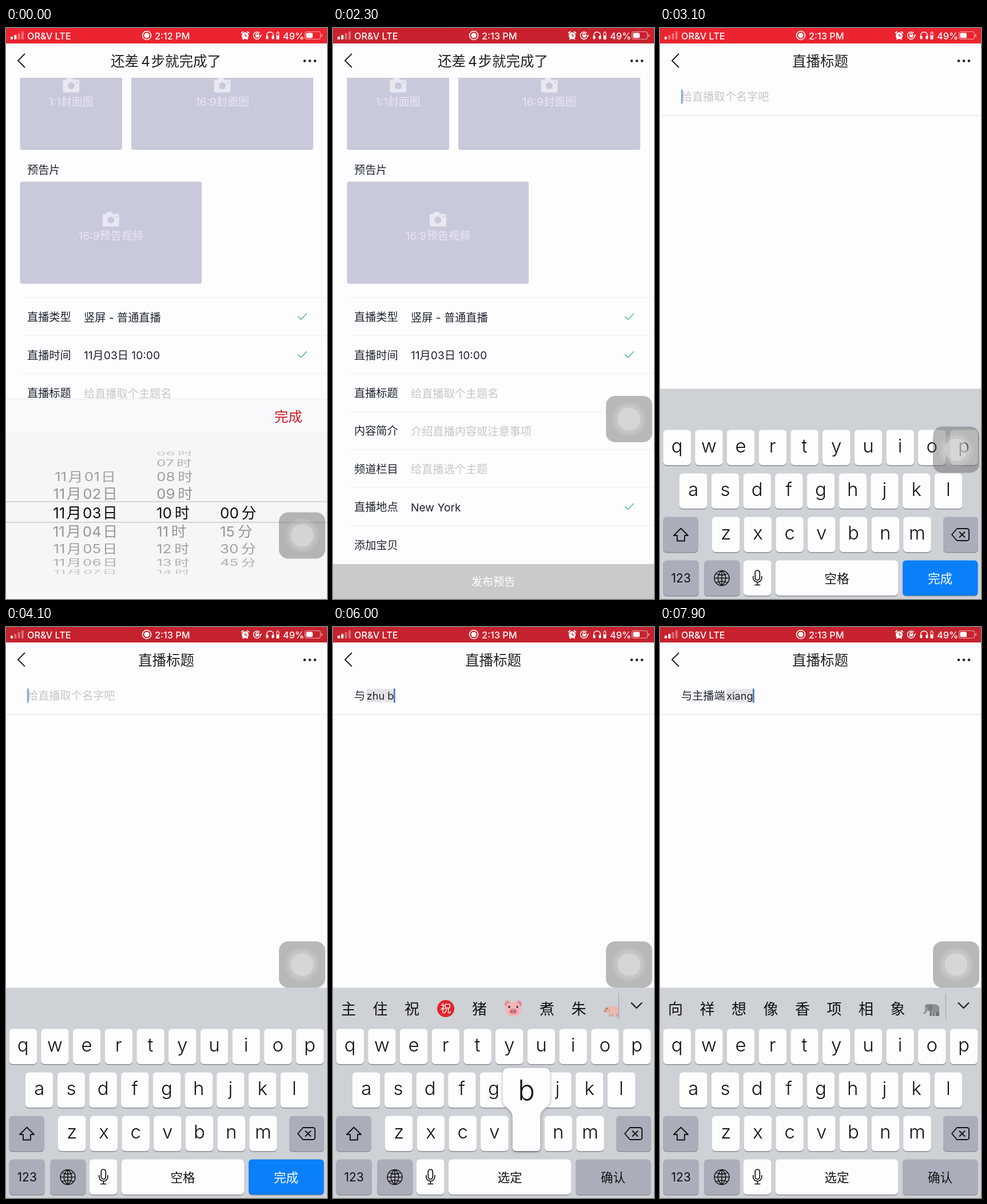
An HTML page with a canvas for the animation above (8000 ms loop, 561 by 998 pixels).

```html
<!DOCTYPE html>
<html lang="zh-CN">
<head>
<meta charset="utf-8">
<style>
html, body { margin: 0; width: 100%; height: 100%; overflow: hidden; background: #fdfcfe }
canvas { display: block }
</style>
</head>
<body>
<canvas id="stage" width="561" height="998"></canvas>
<script>
const W = 561, H = 998, LOOP = 8000;
const g = document.getElementById('stage').getContext('2d');
const FONT = 'Inter, "Noto Sans CJK SC", "Noto Sans CJK", sans-serif';
const PAGE = '#fdfcfe', INK = '#1d2430', HINT = '#c6c6ca', TILE = '#c9c9dc', ON_TILE = '#e8e8f1';

// Drawing helpers
function text(s, x, cy, size = 19.2, color = INK, align = 'left', weight = 400) {
  g.font = `${weight} ${size}px ${FONT}`;
  g.textAlign = align;
  g.fillStyle = color;
  g.fillText(s, x, cy + size * .37);
}
function box(x, y, w, h, color, r = 0) {
  g.fillStyle = color;
  g.beginPath();
  g.roundRect(x, y, w, h, r);
  g.fill();
}
function oval(x, y, rx, ry, color) {
  g.fillStyle = color;
  g.beginPath();
  g.ellipse(x, y, rx, ry, 0, 0, 7);
  g.fill();
}
function stroke(d, color, width, x = 0, y = 0) {
  g.save();
  g.translate(x, y);
  g.strokeStyle = color;
  g.lineWidth = width;
  g.lineJoin = 'round';
  g.stroke(new Path2D(d));
  g.restore();
}
function shifted(x, y, draw) {
  g.save();
  g.translate(x, y);
  draw();
  g.restore();
}

// Timing helpers
const clamp = v => Math.max(0, Math.min(1, v));
const span = (t, start, length) => clamp((t - start) / length);
const smooth = v => v * v * (3 - 2 * v);
const move = (t, start, length) => smooth(span(t, start, length));

function statusBar(t) {
  const cycle = 1870, k = ((t - 2210) % cycle + cycle) % cycle;
  const glow = smooth(clamp((Math.min(k, cycle - k) - 40) / 300));
  const mix = (a, b) => Math.round(a + (b - a) * glow);
  box(0, 0, W, 27, `rgb(${mix(198, 235)},${mix(34, 36)},${mix(46, 48)})`);
  const full = t > 2850 && t < 4600 ? 1 : 2;
  for (let i = 0; i < 4; i++)
    box(8 + i * 6.3, 15 - i * 3, 4, 5 + i * 3, i < full ? '#fff' : 'rgba(255,255,255,.35)', 1);
  text('OR&V LTE', 37, 13.5, 16.3, '#fff', 'left', 500);
  stroke('M253.5 13a7.5 7.5 0 1 1-15 0a7.5 7.5 0 1 1 15 0', '#fff', 1.6);
  oval(246, 13, 4.5, 4.5, '#fff');
  text(t < 1200 ? '2:12 PM' : '2:13 PM', 260, 13.5, 16.3, '#fff', 'left', 500);
  // alarm, rotation lock, headphones with their battery
  oval(418, 13.5, 6, 6, '#fff');
  stroke('M411 9l4-3M425 9l-4-3M413.5 20l2-2M422.5 20l-2-2', '#fff', 2);
  stroke('M418 10v4h3', '#d4232f', 1.3);
  stroke('M443.5 9a6.3 6.3 0 1 0 1.5 5M437 12.5v-1.5a2 2 0 0 1 4 0v1.5', '#fff', 1.4);
  box(436, 12, 6, 4.5, '#fff', 1);
  stroke('M442.5 12l2.5 2.5l2-3', '#fff', 1.2);
  stroke('M455.5 15v-2a6 6 0 0 1 12 0v2', '#fff', 1.4);
  box(454.5, 13.5, 4, 6, '#fff', 1.5);
  box(464.5, 13.5, 4, 6, '#fff', 1.5);
  stroke('M473 8h4v11.5h-4zM474 6.5h2', '#fff', 1);
  box(473, 13, 4, 6.5, '#fff');
  text('49%', 484, 13.5, 16.3, '#fff', 'left', 500);
  stroke('M526 6.5h20a3.5 3.5 0 0 1 3.5 3.5v6a3.5 3.5 0 0 1-3.5 3.5h-20a3.5 3.5 0 0 1-3.5-3.5v-6a3.5 3.5 0 0 1 3.5-3.5z',
    'rgba(255,255,255,.6)', 1.1);
  box(524.5, 8.5, 11.5, 9, '#fff', 2);
  box(551, 11, 1.8, 4.5, 'rgba(255,255,255,.6)', 1);
}

function header() {
  box(0, 27, W, 60, PAGE);
  stroke('M33 45L21 57L33 69', '#222', 2);
  for (const x of [522, 531, 540]) oval(x, 57.5, 2.3, 2.3, '#222');
}

function camera(x, y) {
  box(x - 14.5, y - 9.5, 29, 22, ON_TILE, 3);
  box(x - 8, y - 13, 11, 6, ON_TILE, 2);
  oval(x, y + 1, 6, 6, TILE);
  oval(x + 10, y - 5, 1.6, 1.6, TILE);
}

const FORM = [
  ['直播类型', '竖屏 - 普通直播', true],
  ['直播时间', '11月03日 10:00', true],
  ['直播标题', '给直播取个主题名'],
  ['内容简介', '介绍直播内容或注意事项'],
  ['频道栏目', '给直播选个主题'],
  ['直播地点', 'New York', true],
  ['添加宝贝', '']
];

function formPage() {
  box(0, 27, W, H, PAGE);
  const tile = (x, y, w, h, label, cy) => {
    box(x, y, w, h, TILE, 4);
    camera(x + w / 2, cy);
    text(label, x + w / 2, cy + 28.5, 19, ON_TILE, 'center');
  };
  tile(24.5, 60, 178.5, 153, '1:1封面图', 100);
  tile(219, 60, 318, 153, '16:9封面图', 100);
  text('预告片', 37, 248);
  tile(24.5, 268.5, 317.5, 178.5, '16:9预告视频', 334.5);
  FORM.forEach(([label, value, done], i) => {
    const y = 505 + i * 66.4;
    box(27, y - 34, W, 1, '#f0eff2');
    text(label, 37, y);
    text(value, 136, y + .7, 19.2, done ? INK : HINT);
    if (done) stroke('M510 504L515.5 509.5L525.5 499', '#62bd8f', 1.7, 0, y - 505);
  });
  box(0, 937, W, 61, '#cacaca');
  text('发布预告', 280, 968, 19.2, '#fff', 'center');
  header();
  text('还差', 183, 57.5, 24.5, '#222');
  text('4', 236, 57.5, 24.5, '#222');
  text('步就完成了', 253.5, 57.5, 24.5, '#222');
}

function picker() {
  box(0, 649, W, 349, '#f6f6f8');
  box(0, 649, W, 60, '#f9f9fb');
  box(0, 648, W, 1, '#e9e9eb');
  box(0, 708, W, 1, '#ededef');
  text('完成', 469, 679, 24.4, '#d01c28');
  const two = n => String(n).padStart(2, '0');
  const wheel = (x, align, from, to, label) => {
    for (let k = from; k <= to; k++) {
      const a = k * .305;
      g.save();
      g.translate(x, 847 + 110 * Math.sin(a));
      g.scale(1, Math.cos(a));
      g.globalAlpha = k ? Math.cos(a) ** .7 * .43 : 1;
      text(label(k), 0, 0, 26, '#111', align);
      g.restore();
    }
  };
  wheel(138.5, 'center', -2, 4, k => `11\u200a月\u200a${two(3 + k)}\u200a日`);
  wheel(263, 'left', -4, 4, k => `${two(10 + k)}\u2009时`);
  wheel(374, 'left', 0, 3, k => `${two(15 * k)}\u2009分`);
  box(0, 827.5, W, 1, '#b5b5b9');
  box(0, 863.5, W, 1, '#b5b5b9');
}

// Typing: time, committed text, letters being composed, suggestions (@ marks a pictogram)
const EVENTS = [
  [0, '', '', ''],
  [4450, '', 'y', '有 一 要 也 与 用 又 以 于'],
  [4650, '', 'yu', '与 于 鱼 雨 语 玉 遇 余 育'],
  [4950, '与', '', '其 你 我 他 她 人 此 会 时'],
  [5300, '与', 'z', '在 这 再 着 中 做 最 自 走'],
  [5480, '与', 'zh', '这 着 中 只 找 真 之 张 祝'],
  [5680, '与', 'zhu', '主 住 祝 @z 猪 @p 煮 朱 @g'],
  [5940, '与', 'zhu b', '主播 主板 猪八 主 住 祝 猪'],
  [6110, '与', 'zhu bo', '主播 煮 主 住 祝 猪 朱 助'],
  [6330, '与', 'zhu bo d', '主播的 主播 主 住 祝 猪'],
  [6450, '与', 'zhu bo du', '主播都 主播 主 住 祝 猪'],
  [6570, '与', 'zhu bo dua', '主播端 主播 主 住 祝 猪'],
  [6700, '与', 'zhu bo duan', '主播端 主播 主 住 祝 猪'],
  [6950, '与主播端', '', '着 的 起 在 上来 上 游 了 一'],
  [7260, '与主播端', 'x', '小 想 下 先 行 需 像 写 新'],
  [7390, '与主播端', 'xi', '系 西 洗 细 喜 希 吸 息 习'],
  [7510, '与主播端', 'xia', '下 夏 吓 虾 瞎 霞 侠 峡 狭'],
  [7620, '与主播端', 'xian', '先 现 线 县 闲 显 鲜 限 险'],
  [7740, '与主播端', 'xiang', '向 祥 想 像 香 项 相 象 @e']
];
const stateAt = t => EVENTS.findLast(e => e[0] <= t) || EVENTS[0];

function titlePage(t) {
  const [, done, typing] = stateAt(t);
  box(0, 27, W, H, PAGE);
  header();
  text('直播标题', 280, 57.5, 24.5, '#222', 'center');
  let x = 37, alpha = 1;
  if (!done && !typing) {
    text('给直播取个名字吧', x, 120, 19.2, HINT);
    const k = (t - 2700 + LOOP) % 1000;
    alpha = Math.max(1 - span(k, 350, 150), span(k, 850, 150));
  }
  text(done, x, 120);
  x += g.measureText(done).width;
  if (typing) {
    const size = 18.2;
    g.font = `400 ${size}px ${FONT}`;
    const w = g.measureText(typing).width;
    x += done ? 2 : 0;
    box(x, 108, w + 1, 23.5, '#e4e4e5');
    text(typing, x + .5, 120, size);
    x += w;
  }
  g.globalAlpha = alpha;
  box(x, 107.5, 2.6, 25, '#3f74c8');
  g.globalAlpha = 1;
  box(0, 152, W, 1.4, '#e9e9ec');
}

const PICTOGRAMS = {
  z() {
    oval(0, 0, 15, 15, '#e0242d');
    text('祝', 0, 0, 19, '#fff', 'center', 500);
  },
  p() {
    for (const s of [-1, 1]) oval(s * 10, -8, 5, 6, '#dd8f96');
    oval(0, 1, 14, 13, '#f3b5b8');
    oval(0, 5, 7, 5, '#df8990');
    for (const s of [-1, 1]) {
      oval(s * 2.7, 5, 1.3, 2, '#8f4850');
      oval(s * 7, -3, 1.7, 2, '#333');
    }
  },
  g() {
    for (const x of [-6, -1, 6, 9]) box(x, 6, 3, 8, '#d79d93');
    oval(2, 3, 12, 7.5, '#ecb9ad');
    oval(-9, 2, 5, 5, '#e6ab9f');
    oval(-13, 4, 2, 2.5, '#cc877e');
    oval(-10, 0, .9, .9, '#333');
  },
  e() {
    for (const x of [-3, 2, 7, 10]) box(x, 3, 3.5, 10, '#6f7679');
    oval(4, 0, 10, 8, '#899194');
    oval(-6, -2, 6, 6.5, '#939b9d');
    oval(-2, -2, 4, 6, '#757d80');
    stroke('M-9 0Q-10 9-14 8', '#899194', 3);
    oval(-8, -4, .9, .9, '#222');
  }
};

function suggestions(list) {
  if (!list) return;
  g.save();
  g.beginPath();
  g.rect(0, 632, 499, 70);
  g.clip();
  let x = 14;
  for (const word of list.split(' ')) {
    const icon = PICTOGRAMS[word[1]], w = icon ? 33 : word.length * 26;
    if (icon) shifted(x + w / 2, 667, icon);
    else text(word, x, 667, 26, '#111');
    x += w + 29.5;
  }
  g.restore();
  box(498.7, 640, 1.4, 46, '#a9acb2');
  stroke('M521 656.5L530.5 666L540 656.5', '#222', 2.4);
}

const ROWS = [['qwertyuiop', 5.5], ['asdfghjkl', 34], ['zxcvbnm', 91]];
function key(x, y, w, color = '#fdfdfe') {
  box(x, y + 1.6, w, 61.5, '#8b8d93', 6);
  box(x, y, w, 61.5, color, 6);
}
function letter(c, x, baseline, size) {
  text(c, x, baseline - size * .37, size, '#111', 'center', 300);
}

function popup(c) {
  const r = ROWS.findIndex(row => row[0].includes(c));
  const x = ROWS[r][1] + ROWS[r][0].indexOf(c) * 55.7 + 24.2, y = 702.5 + r * 76;
  g.save();
  g.translate(x, y);
  g.shadowColor = 'rgba(0,0,0,.35)';
  g.shadowBlur = 5;
  g.shadowOffsetY = 1;
  g.fillStyle = '#fdfdfe';
  g.fill(new Path2D('M-31-84H31Q41.500-84 41.500-73V-29C41.500-13 24.200-14 24.200 2V55Q24.200 61.500 18 61.500H-18Q-24.200 61.500-24.200 55V2C-24.200-14-41.500-13-41.500-29V-73Q-41.500-84-31-84Z'));
  g.restore();
  letter(c, x, y - 28, 49);
}

function keyboard(t) {
  const [time, , typing] = stateAt(t), GREY = '#abaeba';
  box(0, 630.5, W, 368, '#ced1d6');
  suggestions(stateAt(t - 150)[3]);
  ROWS.forEach(([chars, left], r) => {
    [...chars].forEach((c, i) => {
      const x = left + i * 55.7, y = 702.5 + r * 76;
      key(x, y, 48.5);
      letter(c, x + 24.2, y + 39.5, 33);
    });
  });
  key(5.5, 854.5, 61, GREY);
  stroke('M0-11.500L12.500 1H6.500V10.500H-6.500V1H-12.500Z', '#111', 1.9, 36.5, 886);
  key(495, 854.5, 61, GREY);
  stroke('M-15 0L-6-10.500H11Q15-10.500 15-7V7Q15 10.500 11 10.500H-6ZM-2-5L8 5M8-5L-2 5', '#111', 1.9, 525, 885.5);
  key(5.5, 930.5, 62.5, GREY);
  text('123', 36.7, 961, 21, '#111', 'center');
  key(77, 930.5, 62.5, GREY);
  stroke('M13 0A13 13 0 1 1-13 0A13 13 0 1 1 13 0M-13 0H13M0-13V13M0-13C-9-6-9 6 0 13C9 6 9-6 0-13M-10-8Q0-3 10-8M-10 8Q0 3 10 8',
    '#111', 1.5, 108, 961.5);
  key(146, 930.5, 48.5);
  stroke('M-4-9A4 4 0 0 1 4-9V0A4 4 0 0 1-4 0ZM-7.500-3V0A7.500 7.500 0 0 0 7.500 0V-3M0 7.500V12.500M-5 12.500H5', '#111', 1.7, 170.3, 961);
  key(202, 930.5, 214);
  text(typing ? '选定' : '空格', 309, 962.5, 21.5, '#111', 'center');
  key(424, 930.5, 131.5, typing ? GREY : '#0a7ffa');
  text(typing ? '确认' : '完成', 489.5, 962.5, 21.5, typing ? '#111' : '#fff', 'center');
  if (typing && t - time < 130) popup(typing.at(-1));
}

function floatingButton(t) {
  const y = 887 - 279 * (move(t, 900, 300) - move(t, 2195, 310)) - 297 * move(t, 2950, 300);
  shifted(517.5, y, () => {
    box(-40.5, -40.5, 81, 81, 'rgba(90,90,90,.42)', 16);
    oval(0, 0, 30, 30, 'rgba(255,255,255,.1)');
    oval(0, 0, 25, 25, 'rgba(255,255,255,.1)');
    oval(0, 0, 19.8, 19.8, 'rgba(235,233,238,.42)');
  });
}

function draw(t) {
  const push = move(t, 2522, 382);
  const rise = 1 - (1 - span(t, 2480, 456)) ** 3;
  const sheet = move(t, 1900, 250);
  if (push < 1) {
    shifted(-280 * push, 0, formPage);
    box(0, 27, W, H, `rgba(0,0,0,${Math.min(.3, push * .48)})`);
  }
  if (push > 0) shifted(W * (1 - push), 0, () => titlePage(t));
  if (sheet < 1) shifted(0, 350 * sheet, picker);
  if (rise > 0) shifted(0, 368 * (1 - rise), () => keyboard(t));
  statusBar(t);
  floatingButton(t);
}

function frame() {
  draw(performance.now() % LOOP);
  requestAnimationFrame(frame);
}
frame();
</script>
</body>
</html>
```
